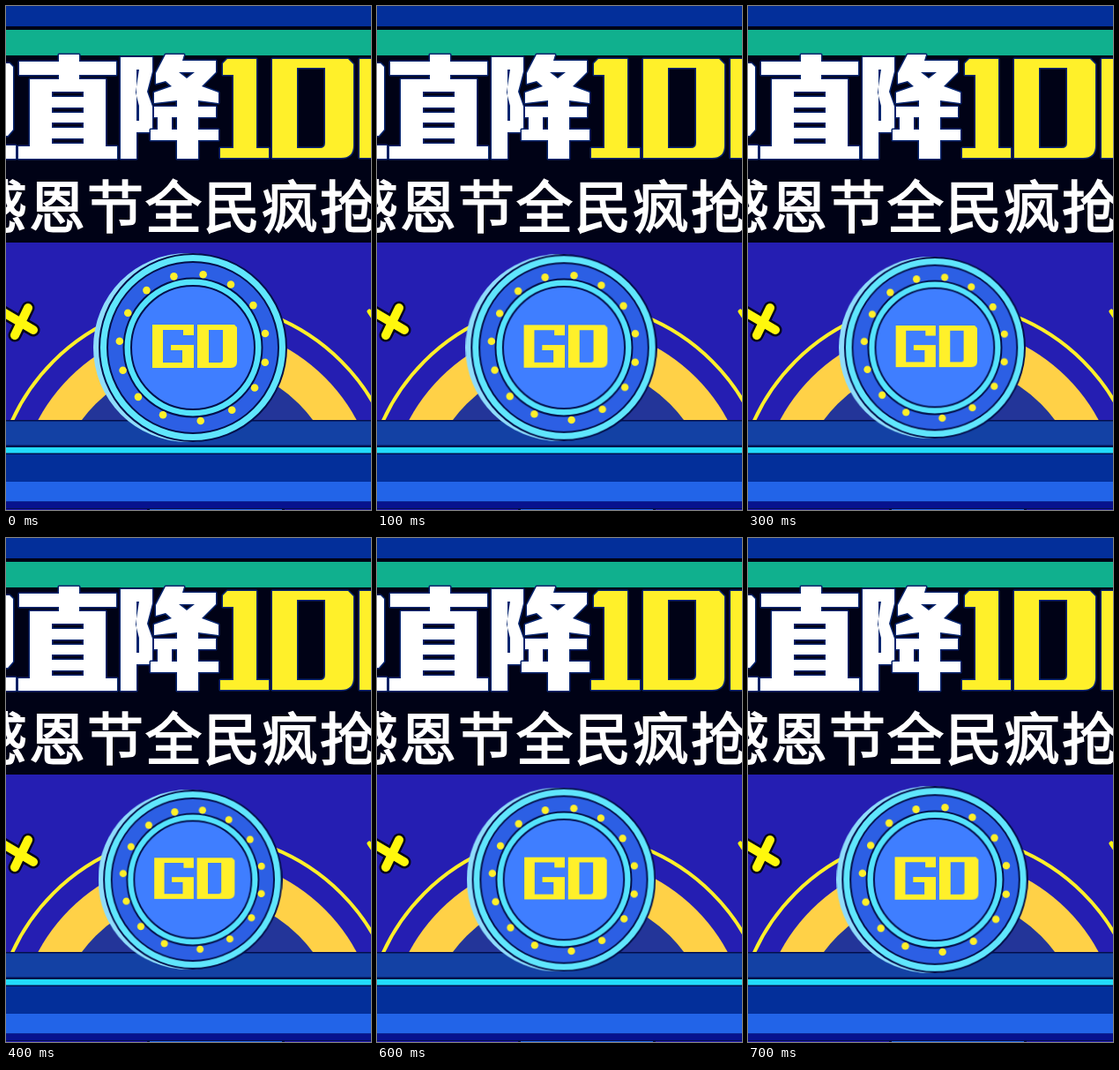
Animation of 414x571 px, one loop 0.8 s. Source, as an HTML page:

```html
<!DOCTYPE html>
<html lang="zh">
<head>
<meta charset="utf-8">
<title>GO</title>
<style>
  html, body { margin: 0; width: 100%; height: 100%; overflow: hidden; background: #000216; }
  svg { display: block; width: 100%; height: 100%; }
  .line {
    font: 500 64px "Noto Sans CJK SC", "Noto Sans CJK", "Noto Sans CJK JP", sans-serif;
    letter-spacing: 2px; fill: #fff; stroke: #fff; stroke-width: 1.8;
  }
  .glyphs { stroke: #06256f; stroke-width: 3; paint-order: stroke; stroke-linejoin: round; fill-rule: evenodd; }
  .badge { transform-origin: 209px 387px; animation: pulse 800ms infinite steps(4, end); }
  .rim { stroke: #03104a; stroke-width: 2; }
  @keyframes pulse {
    0%, 100% { transform: scale(1); }
    50% { transform: scale(.95); }
  }
</style>
</head>
<body>
<svg viewBox="0 0 414 571" preserveAspectRatio="none">
  <defs>
    <clipPath id="sky"><rect y="268" width="414" height="201"/></clipPath>
  </defs>

  <!-- header bands -->
  <rect width="414" height="571" fill="#000216"/>
  <rect width="414" height="23" fill="#032f9a"/>
  <rect y="27" width="414" height="29" fill="#10b08e"/>

  <!-- headline -->
  <g class="glyphs" fill="#fff">
    <path d="M-5 65H4L8 69V140L2 147H-5ZM-5 158H11V173H-5Z"/>
    <path d="M60 55H83V63H125V78H83V83H113V159H126V173H14V159H27V83H60V78H15V63H60Z
             M52 97V103H88V97ZM52 115V121H88V115ZM52 132V138H88V132ZM52 150V156H88V150Z"/>
    <path d="M130 58H166V74L160 97L166 114V143H148V173H130ZM148 72V130H151V113L147 98L151 72Z"/>
    <path d="M181 55H202L200 62H238V75L222 91L241 98V110L218 107V114H238V126H218V140H241V152H218V173H194V152H164V140H172V126H168V114H194V107L168 110V98L188 91L181 85L170 88V76Z
             M196 75L205 82L214 75ZM188 126V140H194V126Z"/>
  </g>
  <g class="glyphs" fill="#fff02a">
    <path d="M251 60H284V161H298V172H243V161H258V78H246V65Z"/>
    <path id="zero" d="M302 60H388L394 66V158Q394 172 380 172H302ZM330 70V161H356Q362 161 362 155V70Z"/>
    <use href="#zero" x="99"/>
  </g>
  <text class="line" x="-40" y="250.500">感恩节全民疯抢</text>

  <!-- arches -->
  <rect y="268" width="414" height="202" fill="#251eb2"/>
  <g clip-path="url(#sky)">
    <circle cx="217" cy="566" r="231" fill="none" stroke="#fff02a" stroke-width="4"/>
    <circle cx="217" cy="566" r="205" fill="#ffd147"/>
    <circle cx="217" cy="566" r="163" fill="#233599"/>
  </g>

  <!-- crosses -->
  <g fill="none" stroke-linecap="round">
    <path d="M-3 347L31 367M25 342L10 373" stroke="#03051c" stroke-width="15"/>
    <path d="M-3 347L31 367M25 342L10 373" stroke="#fff80c" stroke-width="10"/>
    <path d="M412 346L418 355" stroke="#fff80c" stroke-width="5"/>
  </g>

  <!-- floor bands -->
  <rect y="469" width="414" height="102" fill="#030f4c"/>
  <rect y="470.500" width="414" height="27" fill="#1341a4"/>
  <rect y="500" width="414" height="6.500" fill="#22dcfb"/>
  <rect y="508" width="414" height="31" fill="#032f9a"/>
  <rect y="539" width="414" height="22.500" fill="#2264e8"/>
  <rect y="561.500" width="414" height="7.500" fill="#07128e"/>
  <rect y="570" width="160" height="1" fill="#251eb2"/>
  <rect x="163" y="570" width="150" height="1" fill="#2264e8"/>
  <rect x="316" y="570" width="98" height="1" fill="#251eb2"/>

  <g class="badge">
    <circle cx="206" cy="387" r="107" fill="#8fddfc"/>
    <g class="rim">
      <circle cx="212" cy="387" r="106" fill="#60e6fd"/>
      <circle cx="212" cy="387" r="97" fill="#2c5fe4"/>
      <circle cx="212" cy="387" r="78.500" fill="#55e4fd"/>
      <circle cx="212" cy="387" r="70" fill="#3f7eff"/>
    </g>
    <g id="dots" fill="#fff02a"></g>
    <path fill="#fff02a" fill-rule="evenodd" d="M166 361H213V373H201V367H178V404H200V390H187V384H213V410H166Z
      M217 361H259L262 364V403Q262 410 255 410H217ZM230 367V404H243Q246 404 246 401V367Z"/>
  </g>
</svg>
<script>
  const dots = document.getElementById("dots");
  const angles = [-82, -59, -35, -11, 11.6, 33, 58, 84, 114, 138, 162, 185, 208, 231, 255];
  for (const deg of angles) {
    const a = deg * Math.PI / 180;
    const dot = document.createElementNS("http://www.w3.org/2000/svg", "circle");
    dot.setAttribute("cx", 212 + 83.5 * Math.cos(a));
    dot.setAttribute("cy", 387 + 83.5 * Math.sin(a));
    dot.setAttribute("r", 4.3);
    dots.append(dot);
  }
</script>
</body>
</html>
```
